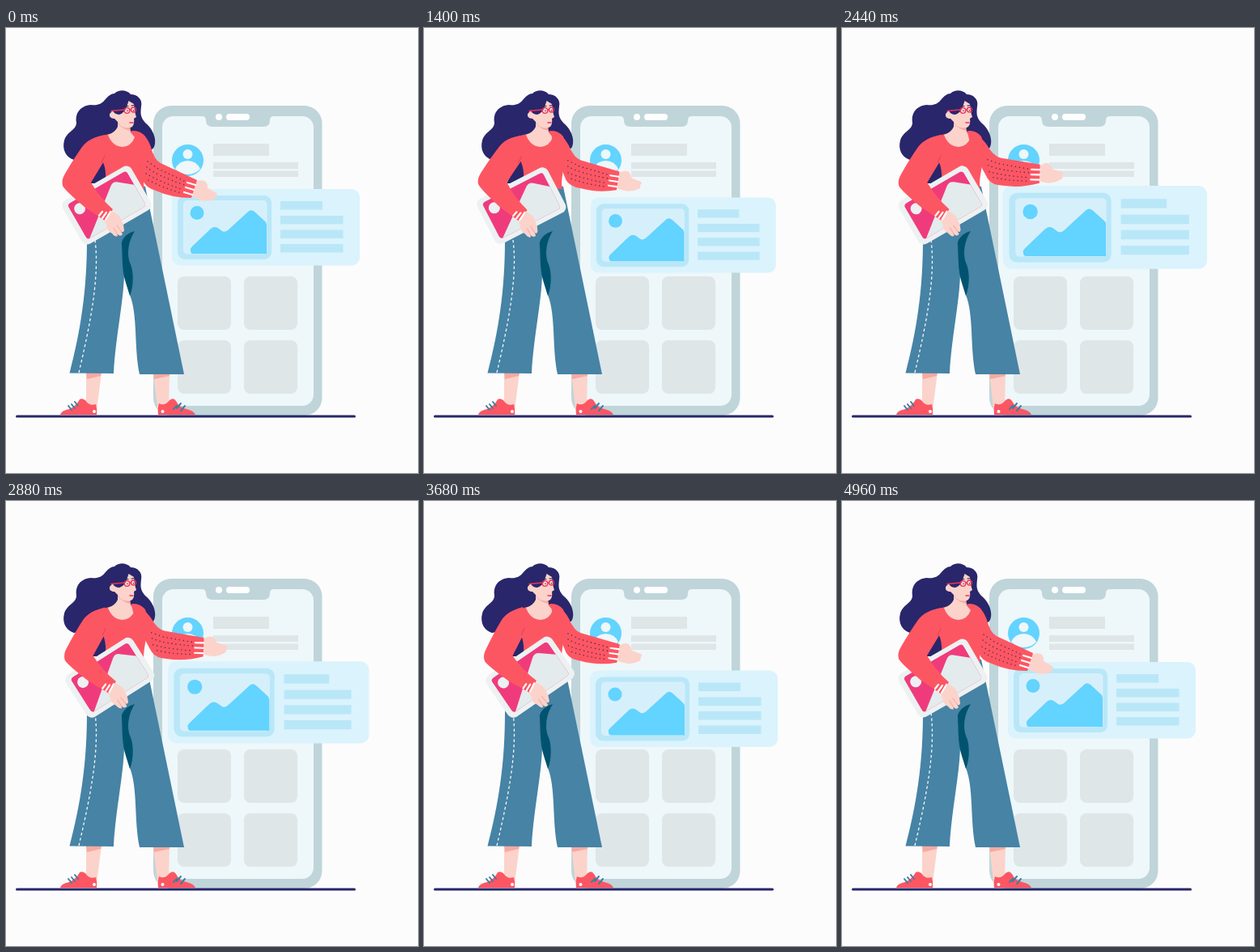
Animation of 509x550 px, one loop 5 s. Source, as an HTML page:

```html
<!DOCTYPE html>
<html lang="en">
<head>
<meta charset="utf-8">
<title>App presentation</title>
<style>
  html, body { margin: 0; width: 100%; height: 100%; overflow: hidden; background: #fcfcfc; }
  svg { display: block; width: 100%; height: 100%; }
  .navy { fill: #29266b; }
  .red { fill: #fd5663; }
  .skin { fill: #fbd3cb; }
  .shade { fill: #f5aaa2; }
  .denim { fill: #4683a5; }
  .frame { fill: #bfd5da; }
  .grey { fill: #dfe6e8; }
  .sky { fill: #b9e7f8; }
  .blue { fill: #63d3ff; }
  .white { fill: #fff; }
  .line { fill: none; stroke-linecap: round; stroke-linejoin: round; }
</style>
</head>
<body>
<svg viewBox="0 0 509 550">
  <g id="phone">
    <rect class="frame" x="182" y="96" width="208.500" height="383" rx="22"/>
    <rect x="193" y="109" width="187" height="358" rx="14" fill="#eef7f9"/>
    <path class="frame" d="M240 104H333V109H331Q326 109 326 114Q326 122 318 122H255Q247 122 247 114Q247 109 242 109H240Z"/>
    <circle class="white" cx="263" cy="110" r="4"/>
    <rect class="white" x="272" y="106" width="29" height="8" rx="4"/>
    <circle class="blue" cx="224.500" cy="163.500" r="19.500"/>
    <circle cx="224.500" cy="156" r="6" fill="#eef7f9"/>
    <path d="M209 174Q214 164 224.500 164T240 174Q234 181 224.500 181T209 174Z" fill="#eef7f9"/>
    <g class="grey">
      <path d="M256 143H325V158H256ZM256 166H361V174H256ZM256 176.500H361V184H256Z"/>
      <rect x="212" y="307" width="66" height="66" rx="8"/>
      <rect x="294" y="307" width="66" height="66" rx="8"/>
      <rect x="212" y="386" width="66" height="66" rx="8"/>
      <rect x="294" y="386" width="66" height="66" rx="8"/>
    </g>
  </g>

  <g id="card">
    <rect x="205" y="199" width="232" height="94.500" rx="10" fill="#dbf3fc"/>
    <rect class="sky" x="212" y="207" width="116" height="79" rx="9"/>
    <rect x="219" y="213" width="103.500" height="66.500" rx="5" fill="#d6f0fb"/>
    <circle class="blue" cx="236" cy="228.500" r="8.500"/>
    <path class="blue" d="M228 275Q227 273 230 270L253 248Q258 244 263 248L267 251Q270 253 274 250L298 228Q302 223 307 227L319 238Q322 240 322 243V279H231Q228 279 228 275Z"/>
    <path class="sky" d="M339 214H391V224.500H339ZM339 232H416.500V242.500H339ZM339 249.500H416.500V260H339ZM339 267H416.500V277.500H339Z"/>
  </g>

  <path class="line" d="M13.500 480H430.500" stroke="#28276b" stroke-width="3"/>

  <g id="legs">
    <path class="skin" d="M99 426H118L112 472H99ZM182 426H202L201 470H187Z"/>
    <path class="shade" d="M99 426H118L117 430L100 434ZM182 426H202L202 430L183 434Z"/>
    <path class="red" d="M67 478Q68 473 78 471Q87 467 91 459Q94 457 98 460Q103 468 111 465Q113 471 112 478Z"/>
    <path class="red" d="M188 478Q187 470 189 464Q196 468 202 460Q207 456 210 461Q214 469 223 471Q232 473 234 478Z"/>
    <path class="line" d="M77 467L81 472M81 465L85 470M85 462L89 467M211 467L207 471M216 464L211 470M221 467L216 473" stroke="#3d7fa3" stroke-width="2"/>
    <circle class="white" cx="109" cy="474" r="2"/>
    <circle class="white" cx="193.500" cy="474" r="2"/>
  </g>

  <path class="navy" d="M134 81C139 76 149 76 154 82C162 82 169 88 167 97C166 106 166 110 172 117C181 124 187 137 183 147C179 154 170 153 163 150H110C100 152 94 162 84 163C74 160 69 150 72 139C75 128 87 126 87 117C85 105 92 96 105 95C113 96 118 94 122 89C126 84 130 81 134 81Z"/>

  <g id="pants">
    <path class="denim" d="M102 240L160 192L172 196L220 428H165C158 395 163 355 153 330L146 305C145 340 135 385 133 427L78.500 426.500C92 375 100 325 100 262Z"/>
    <path d="M159 251C148 254 142 262 143 268C144 285 143 300 148 315L153 331C158 318 158 300 153 290C149 278 151 264 159 251Z" fill="#00536f"/>
    <path class="line" d="M110 262C116 310 103 370 90 426" stroke="#f4f8f9" stroke-width="1.300" stroke-dasharray="3.500 3" style="stroke-linecap:butt"/>
  </g>

  <path class="navy" d="M121 155L102 192L130 192Z"/>
  <path class="red" d="M127 131C117 134 108 135 103 140L118 162C124 172 124 185 122 197L171 199C167 183 180 160 172 134Q166 127 158 127Z"/>

  <g id="head">
    <path class="skin" d="M138 110L138 122Q135 129 126 132Q131 146 144 147Q155 146 159 135L154 129L152 119Z"/>
    <path class="shade" d="M138 115L153 121L154 127Q144 125 138 118Z"/>
    <path class="skin" d="M130 104C134 96 146 97 150 89L158 94C159 100 159 105 161 110L158 112C159 119 157 124 150 123.500C143 123 140 120 138 116L134 112C128 112 126 107 130 104Z"/>
    <path class="navy" d="M128 97L153 86C149 96 149 104 140 107Q133 107 131 100Z"/>
    <g class="line" stroke="#ee3158" stroke-width="1.300">
      <path d="M130 102.500L146 101M152.500 101H154M153 117H157"/>
      <circle cx="149.500" cy="102" r="3.300"/>
      <circle cx="157.500" cy="101" r="3"/>
    </g>
    <path class="line" d="M148 97L151 96.500M155 96L158 95.500M150 102V102.500M157.500 101.500V102" stroke="#29266b" stroke-width="1.200"/>
  </g>

  <g id="pointing">
    <path class="skin" d="M231 192L237 189Q243 187 247 190L249 194Q248 197 251 199L260 204Q262 207 259 208L258 212Q249 215 241 213Q234 211 228 206Z"/>
    <path class="red" d="M160 128C170 129 175 136 179 147Q183 163 191 167L236 188L229 210Q205 210 185 201Q172 197 169 188C165 170 158 145 160 128Z"/>
    <path class="line" d="M175 165L188 174L222 190M174 172Q185 182 223 195M173 180Q190 190 219 200M176 188Q195 198 217 204" stroke="#412958" stroke-width="1.400" stroke-dasharray=".1 5"/>
    <path class="line" d="M224 191L234 194M222 197L232 200M220 203L230 206" stroke="#fff" stroke-width="2.200"/>
  </g>

  <g id="holding">
    <g transform="translate(124.500 219) rotate(-30)">
      <rect x="-49" y="-31" width="98" height="62" rx="8" fill="#edf1f2"/>
      <rect x="-42" y="-25" width="84" height="50" rx="4" fill="#ef3b7c"/>
      <circle cx="-31" cy="-13" r="7" fill="#edf1f2"/>
      <path d="M-39 25L16 -18Q21 -22 26 -18L42 -5V21Q42 25 38 25Z" fill="#e4ebec"/>
    </g>
    <path class="skin" d="M121 236L130 226Q138 229 141 234L145 243L146 250Q145 254 142 251L144 255Q141 259 137 254L138 257Q135 259 131 254Q124 250 124 243Z"/>
    <path class="line" d="M137 244L142 251M133 247L137 254" stroke="#f5aaa2" stroke-width="1"/>
    <path class="red" d="M122 132C108 135 100 139 94 147Q84 161 73 180Q68 188 70 195Q73 201 98 222L122 238L132 224Q116 210 105 191L122 163Z"/>
    <path class="line" d="M122 158L118 166" stroke="#e8445b" stroke-width="1.200"/>
    <path class="line" d="M119 227L115 232M124 228L119 235M129 227L123 237" stroke="#fff" stroke-width="2.200"/>
  </g>
</svg>
<script>
  const DURATION = 5000, STEP = 40;
  const part = id => document.getElementById(id);
  const card = part('card'), pointing = part('pointing'), holding = part('holding');

  // Each track lists [time, value] pairs, eased in and out between them.
  const tracks = {
    cardY: [[0, 0], [1180, 10.5], [2500, 0], [3700, 10.5], [5000, 0]],
    cardScale: [[0, 1], [1250, 1], [1890, 0.9], [2540, 1.1], [3500, 1], [5000, 1]],
    point: [[0, 0], [2620, -15.6], [5000, 0]],
    hold: [[0, 0], [1150, 2.7], [1500, 2.7], [3600, -4.4], [5000, 0]]
  };

  function valueAt(track, time) {
    const next = track.findIndex(key => key[0] > time);
    const [t0, v0] = track[next - 1], [t1, v1] = track[next];
    const p = (time - t0) / (t1 - t0);
    return v0 + (v1 - v0) * p * p * (3 - 2 * p);
  }

  function draw(now) {
    const time = Math.floor(now % DURATION / STEP) * STEP;
    const at = name => valueAt(tracks[name], time);
    card.setAttribute('transform',
      `translate(275 ${246 + at('cardY')}) scale(${at('cardScale')}) translate(-275 -246)`);
    pointing.setAttribute('transform', `rotate(${at('point')} 169 146)`);
    holding.setAttribute('transform', `rotate(${at('hold')} 110 132)`);
  }

  const start = performance.now();
  function tick() {
    draw(performance.now() - start);
    requestAnimationFrame(tick);
  }
  tick();
</script>
</body>
</html>
```
